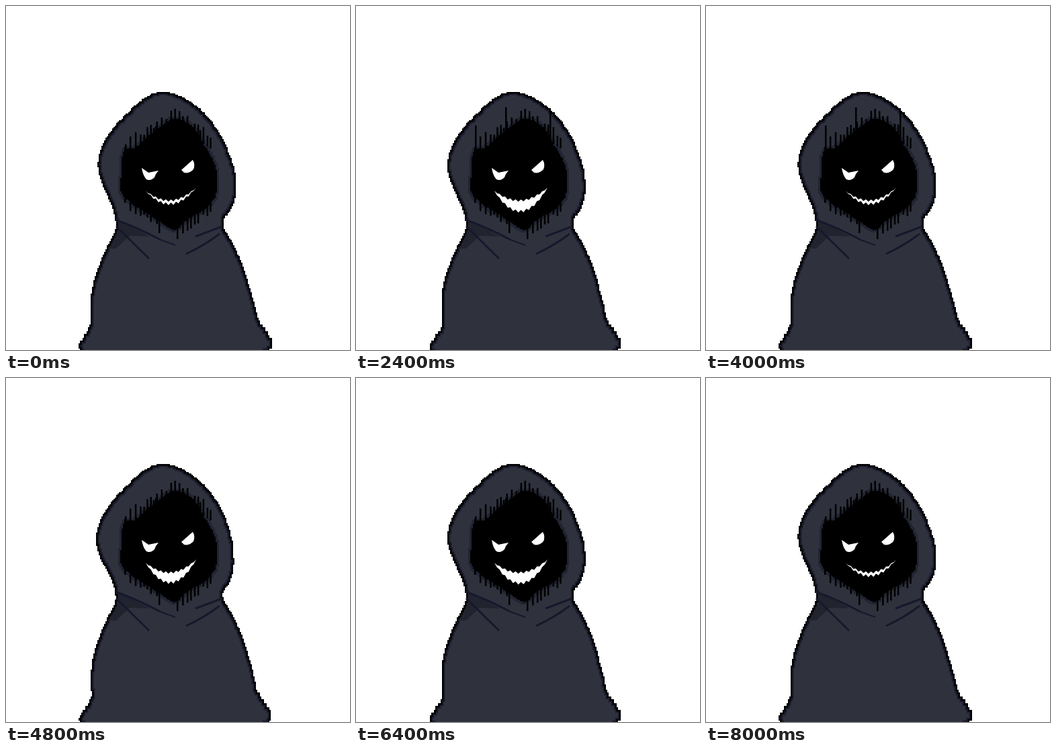
An HTML page that plays this animation: 512x512 px, repeating every 8400 ms.

```html
<!DOCTYPE html>
<html lang="en">
<head>
<meta charset="utf-8">
<title>Hooded figure</title>
<style>
  html, body { margin: 0; width: 100%; height: 100%; overflow: hidden; background: #fff; }
  svg { display: block; width: 100%; height: 100%; }
</style>
</head>
<body>
<svg viewBox="0 0 512 512">
  <clipPath id="clip"><path class="cloak"/></clipPath>
  <g clip-path="url(#clip)">
    <path class="cloak" fill="#2f323d" stroke="#1c1e31" stroke-width="9"/>
    <path d="M163 316L214 343L184 342L164 361L152 361Z" fill="#21232e"/>
    <path class="cloak" fill="none" stroke="#000" stroke-width="5"/>
  </g>
  <g fill="none" stroke="#17182c" stroke-width="3">
    <path d="M163 318Q196 330 230 348M164 328L213 376M322 328L282 343M318 339Q296 356 268 369"/>
    <path d="M230 348L252 356" stroke-width="2"/>
  </g>
  <path id="face" stroke="#212431" stroke-width="6" paint-order="stroke"/>
  <path id="drips"/>
  <g fill="#fff">
    <path d="M202 241L212 248L227 245Q223 249 221 255Q215 261 209 258Q204 253 202 241Z"/>
    <path d="M261 244L278 229Q282 236 279 243Q273 250 265 248Z"/>
    <path id="mouth"/>
  </g>
</svg>
<script>
const STEP = 400, COUNT = 21;
const $ = id => document.getElementById(id);
const parse = s => s.trim().split(/\s+/).map(p => p.split(',').map(Number));

function random(seed) {
  return () => (seed = seed * 16807 % 2147483647) / 2147483647;
}

// Samples a closed Catmull-Rom curve through the points.
function smooth(pts, n = 12) {
  const at = i => pts[(i + pts.length) % pts.length];
  return pts.flatMap((_, i) => Array.from({ length: n }, (_, k) => {
    const t = k / n;
    return [0, 1].map(c => {
      const [a, b, d, e] = [-1, 0, 1, 2].map(o => at(i + o)[c]);
      return b + t / 2 * (d - a + t * (2 * a - 5 * b + 4 * d - e + t * (3 * (b - d) + e - a)));
    });
  }));
}

// Joins points as a pixel staircase on a 2 px grid.
function stairs(pts) {
  const snap = v => Math.round(v / 2) * 2;
  return pts.map(([x, y], i) => i ? `H${snap(x)}V${snap(y)}` : `M${snap(x)} ${snap(y)}`).join('') + 'Z';
}

const outline = parse(`128,520 128,470 128,424 138,386 153,352 163,330 160,306 150,282
  139,256 136,232 144,204 160,180 180,159 201,140 222,129 244,129 268,139 289,154 307,174
  321,196 332,222 340,250 341,280 335,302 323,324 334,348 350,381 362,420 372,464 377,520`);

// The hood leans sideways and the hem flares outwards.
function cloak({ lean, flare }) {
  const bump = (y, mid, size) => Math.exp(-(((y - mid) / size) ** 2));
  return stairs(smooth(outline).map(([x, y]) => [
    x + lean * bump(y, 262, 40) + flare * Math.sign(x - 250) * bump(y, 475, 45),
    y
  ]));
}

const cloaks = {
  A: cloak({ lean: 1.5, flare: 2.5 }),
  B: cloak({ lean: -2.5, flare: 1 }),
  C: cloak({ lean: 0, flare: 0 })
};

// Ragged streaks above and below the face; three of them can grow.
function drips(grow) {
  const rnd = random(41);
  const bar = (x, y, h) => `M${x} ${y}h2.5v${h}h-2.5Z`;
  let d = '';
  for (let x = 176; x < 304; x += 4 + 4 * rnd()) {
    const slope = 0.6 * Math.abs(x - 250);
    const up = 3 + 13 * rnd(), down = 14 * rnd() ** 1.5;
    d += bar(x, 168 + slope - up, up + 12) + bar(x, 322 - slope, 12 + down);
  }
  for (const x of [177, 222, 288]) {
    const y = 168 + 0.6 * Math.abs(x - 250);
    d += bar(x, y - 6 - 28 * grow, 22 + 28 * grow);
  }
  return d + bar(227, 310, 28) + bar(254, 322, 25);
}

const streaks = { short: drips(0), long: drips(1) };

// A grin between two sagging arcs, both with jagged teeth.
function grin({ inset, depth, tooth }) {
  const teeth = 20, left = 206 + inset, right = 285 - inset;
  const edge = (sag, jag) => Array.from({ length: teeth + 1 }, (_, i) => {
    const u = i / teeth, arc = 4 * u * (1 - u);
    return [left + (right - left) * u, 275 - 5 * u + sag * arc + (i % 2 ? jag : -jag) * Math.sqrt(arc)];
  });
  return 'M' + [...edge(17, 1.6), ...edge(depth, tooth).reverse()].join('L') + 'Z';
}

const mouths = {
  s: grin({ inset: 2, depth: 22, tooth: 2 }),
  m: grin({ inset: 2, depth: 32, tooth: 2 }),
  f: grin({ inset: 0, depth: 33, tooth: 2 })
};

$('face').setAttribute('d', stairs(smooth(parse(`175,216 191,211 211,194 230,179 250,167
  276,179 293,205 311,238 314,274 302,298 270,319 250,333 228,319 192,297 171,276 172,246`))));

// One letter per step: cloak pose and mouth size.
const poses = 'ACBACBCACBACBCCBCACBA';
const sizes = 'ssmfffffmmssmmffffmms';
let last = -1;

function draw(time) {
  const i = Math.floor(time / STEP) % COUNT;
  if (i === last) return;
  last = i;
  for (const path of document.querySelectorAll('.cloak')) path.setAttribute('d', cloaks[poses[i]]);
  $('drips').setAttribute('d', i > 4 && i < 11 ? streaks.long : streaks.short);
  $('mouth').setAttribute('d', mouths[sizes[i]]);
}

const start = performance.now();
function tick() {
  draw(performance.now() - start);
  requestAnimationFrame(tick);
}
tick();
</script>
</body>
</html>
```
